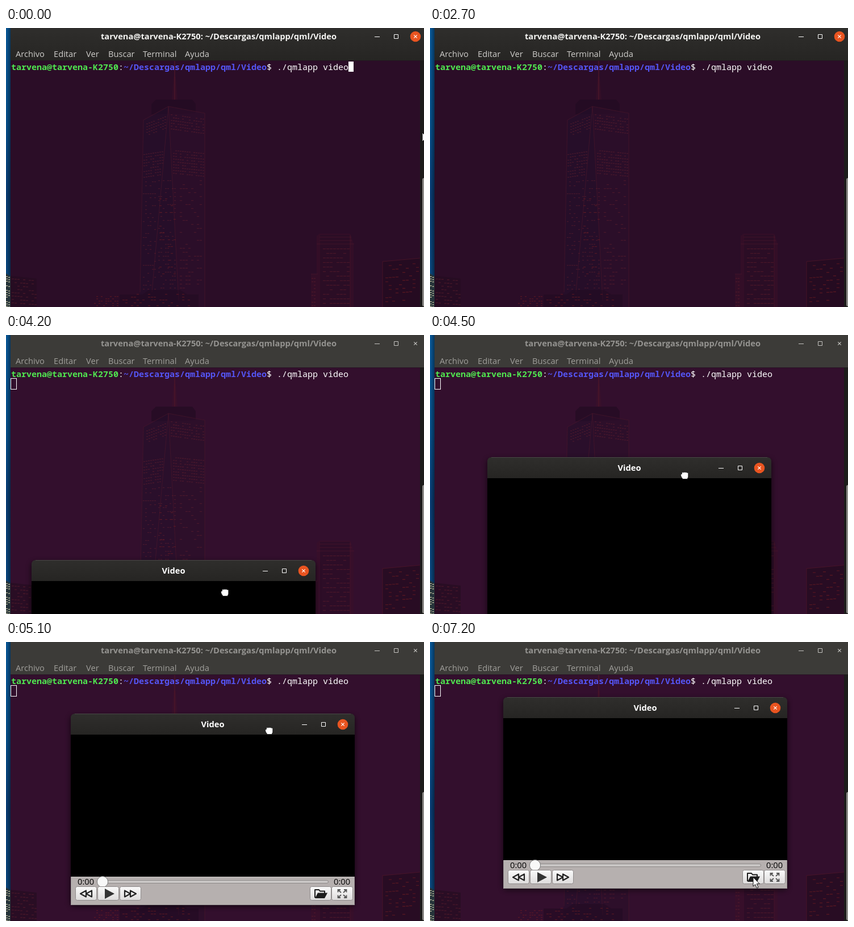
Recreate the animation shown at these times as an HTML page. Size 736 by 491 pixels, loop 8 s.

```html
<!DOCTYPE html>
<html lang="es">
<head>
<meta charset="utf-8">
<title>Terminal</title>
<style>
html, body { margin: 0; width: 100%; height: 100%; overflow: hidden; background: #2b0c27; }
svg { display: block; width: 736px; height: 491px; }
text { font: 14.67px "Open Sans", "Noto Sans", sans-serif; white-space: pre; }
.bold { font-weight: 700; text-anchor: middle; }
.mono { font: 15px "Noto Sans Mono", "DejaVu Sans Mono", monospace; }
.mono .b { font-weight: 700; }
.line { fill: none; stroke: currentColor; }
</style>
</head>
<body>
<svg viewBox="0 0 736 491">
  <defs>
    <linearGradient id="sky" x2="0" y2="1">
      <stop offset="0" stop-color="#0a5c9e"/><stop offset=".35" stop-color="#07528f"/>
      <stop offset=".6" stop-color="#0a3f78"/><stop offset="1" stop-color="#0b4f88"/>
    </linearGradient>
    <linearGradient id="edge"><stop offset="0" stop-opacity="0"/><stop offset="1" stop-opacity=".4"/></linearGradient>
    <linearGradient id="bar" x2="0" y2="1"><stop offset="0" stop-color="#2f2e2c"/><stop offset="1" stop-color="#262523"/></linearGradient>
    <linearGradient id="key" x2="0" y2="1"><stop offset="0" stop-color="#fafafa"/><stop offset="1" stop-color="#dedcdc"/></linearGradient>
    <filter id="blur" x="-10%" y="-10%" width="120%" height="120%"><feGaussianBlur stdDeviation="5"/></filter>
    <g id="winkeys" class="line">
      <path d="M-72 .5h9"/><path d="M-37.5-3.5h7v7h-7z"/><path d="M-2.7-2.7l5.4 5.4m0-5.4l-5.4 5.4" stroke-width="1.2"/>
    </g>
  </defs>

  <rect width="8" height="491" fill="url(#sky)"/>
  <rect width="8" height="491" fill="url(#edge)"/>
  <path d="M0 432l8 5v54H0z" fill="#26343a"/>
  <path id="city" fill="#c9c3a4"/>

  <rect id="body" x="8" y="57" width="728" height="434"/>
  <g id="view">
    <path d="M256 152V134l8-8h64l6 8v16z" fill="#210b20" opacity=".6"/>
    <path d="M297 58v68" stroke="#4a1529" stroke-width="2" opacity=".75"/>
    <path d="M292 126l3-40h4l3 40z" fill="#4a1529" opacity=".25"/>
    <path d="M242 162L286 138L350 150V491H235z" fill="#24102a" opacity=".55"/>
    <path d="M286 138L350 150V491H304z" fill="#361128" opacity=".35"/>
    <path d="M242 162L286 138L350 150V491M286 138L257 465M286 138L304 480M242 162L236 465" fill="none" stroke="#4a172c" opacity=".65"/>
    <path d="M200 491v-22h40l12-8h55l12 8h20v22z" fill="#200b20" opacity=".5"/>
    <path d="M547 491V366l5-4h54l6 18V491zM537 491V433h10v58z" fill="#3c1029" opacity=".5"/>
    <path d="M553 491V364h53V491z" fill="#240d24" opacity=".5"/>
    <path d="M547 380h66M552 368h56M552 374h57M537 433h12M606 364V491" fill="none" stroke="#541a2c" opacity=".5"/>
    <path d="M663 491V411l66-6v86z" fill="#220a1d" opacity=".6"/>
    <path d="M663 411l66-6M663 411v80" fill="none" stroke="#5b1a2a" opacity=".6"/>
    <path d="M8 436l46 5v50H8z" fill="#240c1f" opacity=".6"/>
    <path id="lights" fill="#67202f" opacity=".5"/>
    <path id="warm" fill="#86221f" opacity=".45"/>
  </g>
  <rect x="729" y="57" width="7" height="434" fill="#1d1c1b"/>
  <rect x="733" y="264" width="6" height="226" rx="3" fill="#8b8a87"/>

  <rect id="head" x="8" width="728" height="57"/>
  <path d="M8 57.5h728" stroke="#1d1c1a" opacity=".5"/>
  <text id="title" class="bold" x="374.5" y="20">tarvena@tarvena-K2750: ~/Descargas/qmlapp/qml/Video</text>
  <g id="menu"></g>
  <circle id="close" cx="721" cy="15" r="9.3" fill="#e95420"/>
  <use id="keys" href="#winkeys" x="721" y="15"/>

  <text class="mono" x="9" y="74"><tspan class="b" fill="#50e650">tarvena@tarvena-K2750</tspan><tspan fill="#fff">:</tspan><tspan class="b" fill="#5555f4">~/Descargas/qmlapp/qml/Video</tspan><tspan fill="#fff">$ ./qmlapp video</tspan></text>
  <rect id="caret" width="9" height="18" fill="#fff"/>
  <rect id="hollow" x="8.5" y="76.5" width="10" height="19" fill="none" stroke="#fff"/>

  <g id="win">
    <rect x="-1" y="3" width="502" height="337" rx="8" opacity=".55" filter="url(#blur)"/>
    <path d="M0 37V8q0-8 8-8h484q8 0 8 8v29z" fill="url(#bar)"/>
    <path d="M7 .5h486" stroke="#484745"/>
    <rect y="37" width="500" height="250"/>
    <text class="bold" x="250" y="24" fill="#fff">Video</text>
    <circle cx="479" cy="19" r="9.3" fill="#e95420"/>
    <use href="#winkeys" x="479" y="19" color="#fff"/>
    <rect y="287" width="500" height="50" fill="#b6b0af"/>
    <path d="M0 287.5h500" stroke="#cbc6c5"/>
    <path d="M.5 287v49.5h499V287" fill="none" stroke="#999494"/>
    <text x="12" y="301">0:00</text>
    <text x="463" y="301">0:00</text>
    <rect x="52.5" y="293.5" width="401" height="5" rx="2.5" fill="#c9c6c5" stroke="#8d8988"/>
    <circle cx="56" cy="296" r="9.6" fill="#f8f8f8" stroke="#777"/>
    <g id="pads"></g>
    <g fill="none" stroke="#222" stroke-width="2.2" stroke-linejoin="round">
      <path id="skip" d="M27 311.5v11L17 317zM37 311.5v11L27 317z"/>
      <use href="#skip" transform="matrix(-1 0 0 1 132 0)"/>
    </g>
    <path d="M60 308l17 9-17 9z" fill="#333"/>
    <path d="M430 324v-14h7l2 2.500h8v3.500" fill="none" stroke="#1c1c1c" stroke-width="2" stroke-linejoin="round"/>
    <path d="M430 325l5-9.500h17l-5 9.500z" fill="#1c1c1c"/>
    <g id="full" fill="none" stroke="#555" stroke-width="1.800"></g>
  </g>

  <path id="beam" d="M420 420.500h2.500l1 1 1-1H427M423.500 421v15M420 436.500h2.500l1-1 1 1H427" fill="none" stroke="#ddd"/>
  <path id="hand" d="M-6.500 0q-.5-2.500 2-2.500v-2q1.500-2 3-.5 1.500-1.800 3-.2 1.500-1.300 2.800.4 2.200-.8 2.500 1.300V2q0 2-1.300 3v1.500h-9V5.500Q-6 3-6.500 0z" fill="#fff" stroke="#111" stroke-width=".8"/>
  <path id="arrow" d="M0 0V16L3.700 12.600 6.400 19 9 17.900 6.300 11.600h5z" fill="#fff" stroke="#111"/>
</svg>
<script>
const LOOP = 8000;
const $ = id => document.getElementById(id);
const set = (id, attrs) => { for (const k in attrs) $(id).setAttribute(k, attrs[k]); };
const show = (id, on) => set(id, { visibility: on ? "visible" : "hidden" });
const place = (id, x, y) => set(id, { transform: `translate(${x} ${y})` });

let seed = 11;
const rand = () => (seed = (seed * 16807) % 2147483647) / 2147483647;

// Rows of lit windows; slope tilts each row
function panes(x, y, w, h, dx, dy, chance, slope = 0) {
  let d = "";
  for (let j = 0; j < h; j += dy)
    for (let i = 0; i < w; i += dx)
      if (rand() < chance) d += `M${x + i} ${(y + j + i * slope).toFixed(1)}h${dx - 1}v1.3h${1 - dx}z`;
  return d;
}

set("lights", { d:
  panes(247, 168, 34, 22, 4, 5, .8, -.38) + panes(290, 152, 58, 30, 4, 5, .8, .14) +
  panes(242, 222, 36, 42, 4, 5, .75, -.15) + panes(294, 215, 54, 44, 4, 5, .8, .1) +
  panes(241, 270, 24, 190, 4, 7, .35) + panes(268, 268, 30, 195, 4, 7, .4) +
  panes(306, 268, 40, 195, 5, 7, .3) + panes(558, 388, 46, 100, 6, 8, .6) +
  panes(538, 440, 8, 50, 4, 6, .6) + panes(10, 441, 43, 48, 5, 6, .6, .08) });
set("warm", { d:
  panes(155, 472, 44, 18, 4, 4, .5) + panes(205, 468, 120, 22, 5, 5, .25) +
  panes(668, 418, 58, 70, 6, 7, .3, -.08) + panes(270, 300, 28, 150, 5, 12, .25) });
set("city", { d: panes(0, 437, 8, 54, 4, 4, .75, .3) });

const menu = { Archivo: 17, Editar: 84, Ver: 141, Buscar: 180, Terminal: 241, Ayuda: 315 };
$("menu").innerHTML = Object.entries(menu).map(([s, x]) => `<text x="${x}" y="51">${s}</text>`).join("");
$("pads").innerHTML = [8, 47, 86, 421, 459].map(x =>
  `<rect x="${x + .5}" y="304.500" width="37" height="24" rx="3" fill="url(#key)" stroke="#8f8b8b"/>`).join("");
$("full").innerHTML = [[1, 1], [-1, 1], [1, -1], [-1, -1]].map(([a, b]) =>
  `<path transform="translate(478 317) scale(${a} ${b})" d="M2 2L7 6.500M3 7h4.500V2.500"/>`).join("");

// time, window x, y, hand x, y
const drag = [
  [4200, 45, 396, 385, 453], [4400, 78, 300, 424, 334], [4500, 101, 215, 448, 247],
  [4600, 114, 165, 463, 196], [4800, 114, 152, 463, 183], [4900, 114, 142, 463, 172],
  [5000, 114, 133, 463, 163], [5100, 114, 126, 463, 156], [5300, 121, 112, 471, 141],
  [5400, 129, 98, 478, 126], [5500, 129, 97, 478, 126]
];
// time, arrow x, y
const point = [
  [0, 733, 184], [200, 733, 226], [300, 734, 270], [400, 734, 302], [500, 760, 310],
  [6100, 478, 122], [6300, 500, 190], [6400, 535, 265], [6500, 565, 335], [6600, 588, 385],
  [6700, 600, 415], [6800, 602, 421], [7100, 580, 416], [7200, 569, 414]
];
const at = (keys, t) => keys.findLast(k => k[0] <= t);
const within = (t, a, b) => t >= a && t < b;

function draw(t) {
  const away = t >= 4200;
  set("body", { fill: away ? "#330f2d" : "#2b0d27" });
  set("head", { fill: away ? "#3c3b38" : "url(#bar)" });
  set("title", { fill: away ? "#949390" : "#f4f4f2" });
  set("menu", { fill: away ? "#a09f9b" : "#cfcecb" });
  set("keys", { color: away ? "#c4c3c0" : "#fff" });
  show("close", !away);

  const entered = t >= 1100;
  set("caret", entered ? { x: 9, y: 77 } : { x: 603, y: 59 });
  show("caret", t < 300 || within(t, 900, 1500) || within(t, 2200, 2700) || within(t, 3200, 4000));
  show("hollow", away);

  show("win", away);
  show("hand", within(t, 4200, 6100));
  if (away) {
    const [, x, y, hx, hy] = at(drag, t);
    place("win", x, y);
    place("hand", hx, hy);
  }
  show("beam", within(t, 3300, 3500));
  show("arrow", t < 500 || t >= 6100);
  const [, ax, ay] = at(point, t);
  place("arrow", ax, ay);
}

const start = performance.now();
function tick() {
  draw((performance.now() - start) % LOOP);
  requestAnimationFrame(tick);
}
tick();
</script>
</body>
</html>
```
